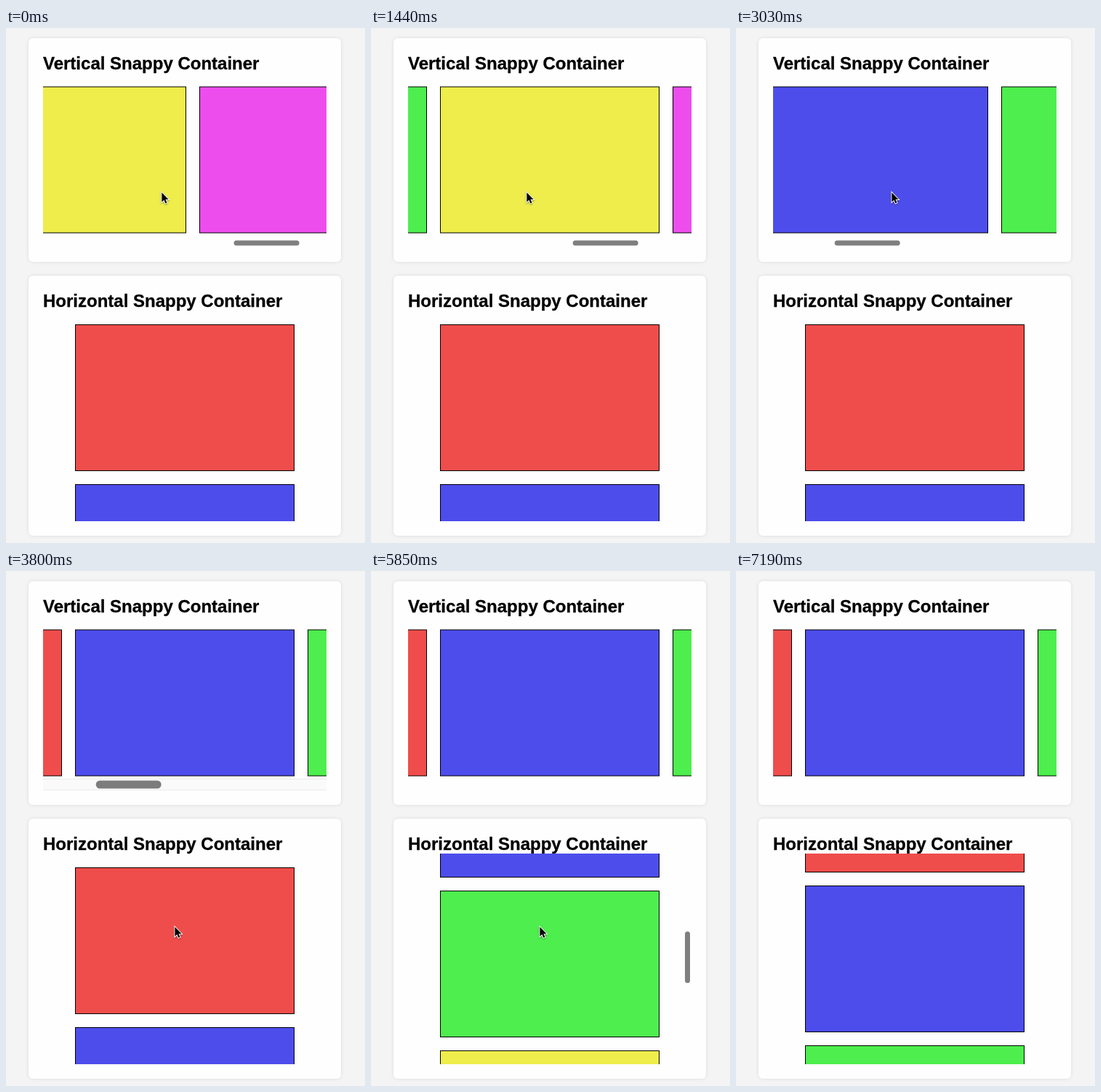
These frames come from a looping animation (494 px wide and 709 px high, 7.49 s). An HTML page with a canvas:

```html
<!DOCTYPE html>
<html lang="en">
<head>
<meta charset="utf-8">
<title>Snappy containers</title>
<style>
  html, body { margin: 0; width: 100%; height: 100%; overflow: hidden; background: #f4f4f4; }
  section {
    position: absolute; left: 31px; width: 430px; box-sizing: border-box; padding: 21px 20px;
    background: #fefefe; border-radius: 6px; box-shadow: 0 0 5px rgba(0, 0, 0, .1);
  }
  h2 {
    margin: 0; font: bold 24px/28px "Liberation Sans", Arial, sans-serif; color: #000;
    white-space: nowrap; -webkit-text-stroke: .3px #000;
  }
  canvas { position: absolute; left: 0; top: 0; }
</style>
</head>
<body>
<section style="top:13.5px;height:308px"><h2>Vertical Snappy Container</h2></section>
<section style="top:341px;height:358px"><h2>Horizontal Snappy Container</h2></section>
<canvas width="494" height="709"></canvas>
<script>
const ctx = document.querySelector('canvas').getContext('2d');
const LOOP = 7490, FIRST_TICK = 90, TICK = 58.7;
const COLORS = ['#ef4d4b', '#4d4dec', '#4dee4d', '#eeed4b', '#ee4dee'];
const SNAP_DELAY = 3, SNAP_TICKS = 3;

// A swipe is [start tick, end tick, position reached]; the nearest panel is then snapped to.
const horizontal = {
  from: 1236, pitch: 320, offset: 0,
  swipes: [[-22, 18, 935], [29, 41, 640], [46, 51, 370]],
};
const vertical = {
  from: 0, pitch: 220, offset: -25,
  swipes: [[64, 71, 148], [81.1, 86, 421], [97.7, 103, 245]],
};

const progress = (tick, start, end) => Math.min(1, Math.max(0, (tick - start) / (end - start)));
const mix = (a, b, p) => a + (b - a) * p;
const fling = p => 1 - (1 - p ** 3) ** 3;
const smooth = p => p * p * (3 - 2 * p);

function scrollAt({ from, pitch, offset, swipes }, tick) {
  let position = from;
  for (const [start, end, reached] of swipes) {
    const panelStop = Math.round((reached - offset) / pitch) * pitch + offset;
    const snapStart = end + SNAP_DELAY;
    position = mix(position, reached, fling(progress(tick, start, end)));
    position = mix(position, panelStop, smooth(progress(tick, snapStart, snapStart + SNAP_TICKS)));
  }
  return Math.round(position);
}

function clipped(x, y, w, h, draw) {
  ctx.save();
  ctx.beginPath();
  ctx.rect(x, y, w, h);
  ctx.clip();
  draw();
  ctx.restore();
}

function panel(x, y, color) {
  ctx.fillStyle = '#000';
  ctx.fillRect(x, y, 302, 202);
  ctx.fillStyle = color;
  ctx.fillRect(x + 1, y + 1, 300, 200);
}

function bar(x, y, w, h, alpha) {
  ctx.fillStyle = `rgba(0, 0, 0, ${alpha / 2})`;
  ctx.beginPath();
  ctx.roundRect(x, y, w, h, Math.min(w, h) / 2);
  ctx.fill();
}

function track() {
  ctx.fillStyle = '#ececec';
  ctx.fillRect(51, 286, 390, 16);
  ctx.fillStyle = '#fafafa';
  ctx.fillRect(51, 287, 390, 14);
}

const arrow = new Path2D('M0 0V14.2L3.3 11.2L5.5 16.3L7.7 15.3L5.5 10.4H10Z');
function cursor(tick) {
  const down = smooth(progress(tick, 58, 64));
  const leave = smooth(progress(tick, 114, 122));
  ctx.save();
  ctx.translate(mix(mix(214, 232, down), 412, leave) + .4, mix(mix(226.5, 490, down), 712, leave));
  ctx.scale(.92, .92);
  ctx.lineWidth = 2;
  ctx.strokeStyle = '#fff';
  ctx.shadowColor = 'rgba(0, 0, 0, .4)';
  ctx.shadowBlur = 2;
  ctx.shadowOffsetY = 1;
  ctx.stroke(arrow);
  ctx.shadowColor = 'transparent';
  ctx.fillStyle = '#000';
  ctx.fill(arrow);
  ctx.restore();
}

function render(time) {
  const tick = Math.max(0, Math.floor((time - FIRST_TICK) / TICK + .15) + 1);
  const sx = scrollAt(horizontal, tick);
  const sy = scrollAt(vertical, tick);
  const hovered = tick >= 60;
  ctx.clearRect(0, 0, 494, 709);

  clipped(51, 80, 390, 222, () => {
    COLORS.forEach((color, i) => panel(95 + 320 * i - sx, 80.5, color));
    if (hovered && tick < 67) track();
    bar(46.7 + .2406 * sx, hovered ? 288.5 : 292.5, 90, hovered ? 11 : 7, 1 - progress(tick, 65, 71));
  });
  clipped(51, 389, 390, 290, () => {
    COLORS.forEach((color, i) => panel(95, 408 + 220 * i - sy, color));
    bar(432, 391 + .258 * sy, 7, 71, progress(tick, 65, 66) - progress(tick, 114, 119));
  });
  cursor(tick);
}

function loop() {
  render(performance.now() % LOOP);
  requestAnimationFrame(loop);
}
loop();
</script>
</body>
</html>
```
